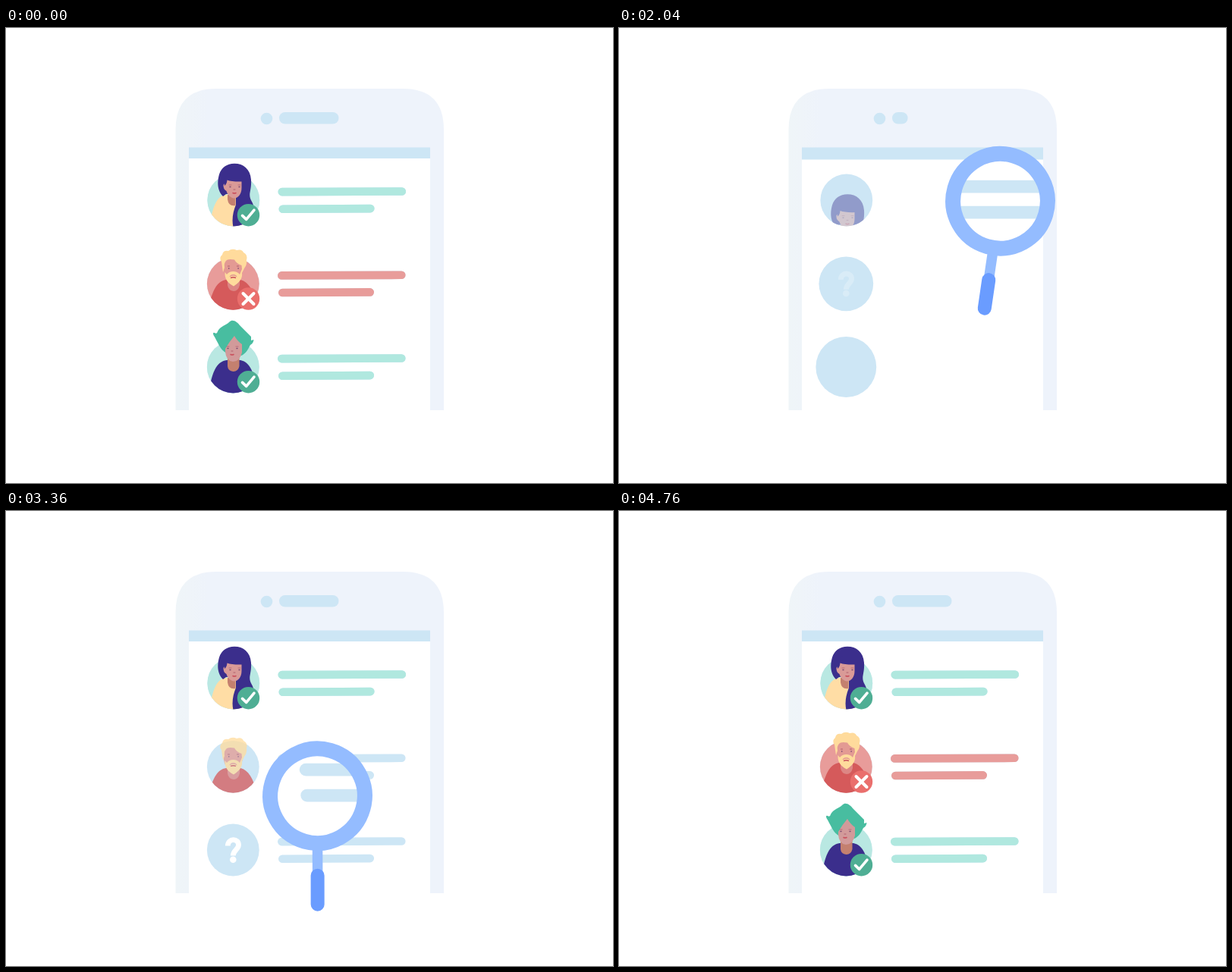
Animation of 800x600 px, one loop 4.88 s. Source, as an HTML page:

```html
<!DOCTYPE html>
<html lang="en">
<head>
<meta charset="utf-8">
<title>Profile check</title>
<style>
  html, body { margin: 0; width: 100%; height: 100%; overflow: hidden; background: #fff; }
  svg { display: block; width: 800px; height: 600px; }
</style>
</head>
<body>
<svg id="stage" viewBox="0 0 800 600" xmlns="http://www.w3.org/2000/svg"></svg>
<script>
const LOOP = 4880, BLUE = '#cde6f5', MINT = '#b0e8df', RED = '#e89c9a';

const rows = [
  { x: 299.8, y: 227, zoomY: 229, tint: '#b9e8e2', bar: MINT, badge: '#4fae94', q: 1640, pop: 1560, enter: 1928, turn: 2220, mark: 2480, fill: 2443 },
  { x: 299.3, y: 337.3, zoomY: 296, tint: RED, bar: RED, badge: '#ea6f6d', cross: true, q: 2000, pop: 1624, enter: 3150, turn: 3400, mark: 3600, fill: 3486 },
  { x: 299.3, y: 447, zoomY: 430, tint: '#b9e8e2', bar: MINT, badge: '#4fae94', q: 2080, pop: 1704, enter: 4180, turn: 4300, mark: 4420, fill: 4284 }
];

const face = (x, y) => `
  <g fill="none" stroke="#b0606f" stroke-width="1" stroke-linecap="round">
    <path d="M${x - 7} ${y - 2}h3M${x + 5} ${y - 2}h3" stroke-width=".8"/>
    <path d="M${x - 6} ${y + .5}h1M${x + 6} ${y + .5}h1" stroke="#7a4a70" stroke-width="1.3"/>
    <path d="M${x - 1} ${y + 4}h2"/><path d="M${x - 2} ${y + 8.5}q2 1.2 4 0" stroke="#c94f5c" stroke-width="1.5"/>
  </g>`;

const people = [
  `<path fill="#ffdda5" d="M268 265C271 240 276 224 287 220.500Q297 218 309 222L318 265Z"/>
   <path fill="#3b2e8c" d="M286 222C277 213 279 200 281 193C284 184 291 178.700 301 178.700C313 178.700 322 186 323 200C324 216 318 219 324 229C328 236 330 252 324 265H300C297 253 299 243 303 233V218L290 219Z"/>
   <path fill="#c4806f" d="M292 220h10.500v14q-9 2-10.500-8Z"/>
   <path fill="#d99a97" d="M289.500 199H310.500V211C310.500 219 306 224.500 300.500 224.500C296 224.500 291.500 219 290.500 215Q286 212 286.500 207Q287.500 204 290 206Z"/>
   <path fill="#3b2e8c" d="M288 208Q286 194 295 191H312V202.500Q298 203 291.500 200.500Q291 206 288 208Z"/>
   ${face(301, 209)}`,
  `<path fill="#d55a5b" d="M265 376C271 348 277 334 290 332H309C321 335 328 349 333 376Z"/>
   <path fill="#dd8684" d="M292 329H308V339Q306 347 300 347Q293 346 292 339Z"/>
   <path fill="#e39a93" d="M287 304H311.500V322Q309 334 299.500 334Q289 334 287 321Z"/>
   <path fill="#ffdb9c" d="M286 322L284 308Q280 303 285 299Q286 293 293 294Q298 290 304 293Q311 291 313 296Q319 299 317 306Q318 312 314 317L311 323C312 331 307 336 300 340.500C292 336 288 331 288.500 322L291 325Q294 321 299.500 321Q305 321 308 325L311 318L310.500 313Q304 311 301 305.500Q292 304 290 307Q287 310 288 316Z"/>
   <path fill="#e39a93" d="M294.500 328.500Q295 325 299.500 325Q304 325 304.500 328.500Q302 326.500 299.500 326.800Q297 326.500 294.500 328.500Z"/>
   <path d="M296 329.500q3.500-1.500 7 0" fill="none" stroke="#c94f5c" stroke-width="1.400"/>
   <path d="M292 314h3m9 0h3" stroke="#b0606f"/><path d="M293 317h1.400m11 0h1.400" stroke="#7a4a70" stroke-width="1.400"/>`,
  `<path fill="#3b2e8c" d="M266 486C271 456 276 440 291 438H309C323 441 327 456 333 486Z"/>
   <path fill="#c4806f" d="M292 432H307.500V446Q306 453 299.500 453Q292.500 452 292 446Z"/>
   <path fill="#48bda0" d="M288 427C282 423 279 414 273.500 405Q272 401 275 402Q278 404 279 400C282 393 291 392 294.500 387.500C299 383 305 388 309 393L323 407V412L326.500 411Q326 416 322 418C318 426 315 430 310 432L292 430Z"/>
   <path fill="#d29a9a" d="M289 423Q294 414 301 406Q305 413 311 417V428Q308 440 299 440Q290 439 289 427Z"/>
   ${face(298, 422)}`
];

// Bar geometry shared by the list and the magnified list
const bars = r => [[r.x + 64, r.y - 11.2, 158], [r.x + 65, r.y + 11.4, 115.5]];
const barLines = (r, i, kind, color) => bars(r).map((b, j) =>
  `<path id="${kind}${i}${j}" fill="none" stroke="${color}" stroke-width="10.600" stroke-linecap="round"/>`).join('');

const blank = (r, i, kind) => `
  <g id="${kind}disc${i}"><circle cx="${r.x}" cy="${r.y}" r="34.400" fill="${BLUE}"/></g>
  <g id="${kind}q${i}" transform="translate(${r.x} ${r.y})">
    <path d="M-7-5.500C-6.800-16 7.500-15.500 7.200-6.500C7-.5 0 .5 0 7.500" fill="none" stroke="#fff" stroke-width="6.800"/>
    <circle cy="12.700" r="4.300" fill="#fff"/>
  </g>`;

const row = (r, i) => `
  ${blank(r, i, 's')}
  <circle id="tint${i}" cx="${r.x}" cy="${r.y}" r="34.400" fill="${r.tint}"/>
  <clipPath id="cut${i}"><path d="M${r.x - 60} ${r.y - 150}h120v150h-25.600a34.400 34.400 0 0 1-68.800 0h-25.600Z"/></clipPath>
  <g clip-path="url(#cut${i})"><g id="person${i}">${people[i]}</g></g>
  <g id="badge${i}"><circle r="14.700" fill="${r.badge}"/>
    <g fill="none" stroke="#fff" stroke-width="${r.cross ? 4 : 3.6}" stroke-linecap="round" stroke-linejoin="round">
      ${(r.cross ? ['M-7-7L7 7', 'M7-7L-7 7'] : ['M-8 .7L-2.800 5.700L7.500-6.500'])
        .map((d, k) => `<path id="mark${i}${k}" pathLength="1" d="${d}"/>`).join('')}
    </g></g>
  ${barLines(r, i, 'bar', BLUE)}${barLines(r, i, 'fill', r.bar)}`;

const zoomRow = (r, i) => `
  <g transform="translate(299.500 ${r.zoomY}) scale(1.500) translate(-299.500 ${-r.zoomY})">
    ${blank(r, i, 'z')}
    <g id="zbars${i}" stroke="${BLUE}" stroke-width="11.200" stroke-linecap="round">
      ${bars(r).map(([x, y, w]) => `<path d="M${x} ${y}h${w}"/>`).join('')}</g>
  </g>`;

document.getElementById('stage').innerHTML = `
  <defs>
    <linearGradient id="shell"><stop stop-color="#eff5f8"/><stop offset=".05" stop-color="#eff4f9"/><stop offset=".12" stop-color="#eef3fb"/></linearGradient>
    <clipPath id="lensCut"><circle id="lensHole" r="54"/></clipPath>
  </defs>
  <g id="scene">
    <path id="phone" fill="url(#shell)" d="M223.500 504V134Q223.500 80 277.500 80H523Q577 80 577 134V504H559V158H241V504Z"/>
    <rect id="band" y="157.500" fill="${BLUE}"/>
    <g id="dot"><circle r="7.800" fill="${BLUE}"/></g>
    <rect id="speaker" x="360" y="111" height="15.500" rx="7.750" fill="${BLUE}"/>
    ${rows.map(row).join('')}
  </g>
  <g id="lens" clip-path="url(#lensCut)"><rect width="800" height="600" fill="#fff"/>${rows.map(zoomRow).join('')}</g>
  <g id="glass">
    <g id="arm" stroke="#94bcff" fill="none">
      <path id="stem" stroke-width="13.500"/>
      <path id="grip" stroke="#6a9cff" stroke-width="18" stroke-linecap="round"/>
    </g>
    <circle id="ring" r="62.300" pathLength="360" fill="none" stroke="#94bcff" stroke-width="20" stroke-linecap="round"/>
  </g>`;

const parts = {};
document.querySelectorAll('#stage [id]').forEach(e => parts[e.id] = e);
const set = (id, attrs) => { for (const k in attrs) parts[id].setAttribute(k, attrs[k]); };
const fade = (id, o) => set(id, { opacity: o });

const seg = (t, a, b) => Math.min(1, Math.max(0, (t - a) / (b - a)));
const inOut = u => u < .5 ? 4 * u ** 3 : 1 - 4 * (1 - u) ** 3;
const outQuad = u => 1 - (1 - u) ** 2;
const back = (u, s) => u <= 0 ? 0 : 1 + (s + 1) * (u - 1) ** 3 + s * (u - 1) ** 2;

// Eased moves between stops: [start, end, value]
const travel = (t, from, moves) => moves.reduce((v, [a, b, to]) => v + (to - v) * inOut(seg(t, a, b)), from);

// Smooth curve through [time, value] keys
function curve(t, keys) {
  const n = keys.length - 1;
  if (t <= keys[0][0]) return keys[0][1];
  if (t >= keys[n][0]) return keys[n][1];
  const i = keys.findIndex(k => k[0] > t) - 1;
  const slope = k => k < 1 || k >= n ? 0 : (keys[k + 1][1] - keys[k - 1][1]) / (keys[k + 1][0] - keys[k - 1][0]);
  const [t0, a] = keys[i], [t1, b] = keys[i + 1], d = t1 - t0, u = (t - t0) / d, w = 1 - u;
  return a * w * w * (1 + 2 * u) + b * u * u * (3 - 2 * u) + d * u * w * (slope(i) * w - slope(i + 1) * u);
}

const swing = [[1000, 125], [1090, 126], [1350, -47], [1520, 16], [1680, 0], [1880, -30], [2040, -8.5],
  [2210, 22], [2360, 0], [2560, 18], [2760, 3.2], [2960, -26], [3110, 4], [3230, -14], [3360, 0],
  [3540, 8], [3660, 4], [3840, 52.6], [4000, 45], [4110, 8], [4230, -42], [4340, 0], [4460, 125]];

function drawBar(id, [x, y, w], u) {
  set(id, { d: `M${x} ${y + .3}L${x + w * u} ${y + .3 - .6 * u}`, visibility: u > 0 ? 'visible' : 'hidden' });
}

function drawRow(r, i, t) {
  const s = back(seg(t, r.pop, r.pop + 480), 3);
  const q = seg(t, r.q, r.q + 160) * (1 - seg(t, r.enter - 120, r.enter));
  for (const k of 'sz') {
    set(k + 'disc' + i, { transform: `translate(${r.x} ${r.y}) scale(${s}) translate(${-r.x} ${-r.y})` });
    fade(k + 'q' + i, q);
  }
  fade('zbars' + i, seg(t, 1640, 1720));
  fade('tint' + i, seg(t, r.turn, r.turn + 140));

  const p = seg(t, r.enter, r.enter + 280);
  set('person' + i, { opacity: p, transform: `translate(0 ${114 * (1 - p) ** 2})` });

  set('badge' + i, { transform: `translate(319.500 ${r.y + 19.7}) scale(${back(seg(t, r.mark, r.mark + 160), 1.7)})` });
  const strokes = r.cross ? [[100, 200], [200, 280]] : [[120, 270]];
  strokes.forEach(([a, b], k) => {
    const u = seg(t, r.mark + a, r.mark + b);
    set('mark' + i + k, { 'stroke-dasharray': u < 1 ? `${u} 2` : 'none', visibility: u > 0 ? 'visible' : 'hidden' });
  });

  bars(r).forEach((b, j) => {
    const start = 2180 + 80 * i + 40 * j, f = r.fill + 32 * j;
    drawBar(`bar${i}${j}`, b, outQuad(seg(t, start, start + 460)));
    drawBar(`fill${i}${j}`, b, inOut(seg(t, f, f + 440)));
  });
}

function drawPhone(t) {
  const k = 1 + .028 * Math.sin(Math.PI * seg(t, 1700, 2000));
  set('phone', { opacity: seg(t, 1540, 1720), transform: `translate(0 292) scale(1 ${k}) translate(0 -292)` });
  const w = 318 * inOut(seg(t, 1440, 1640));
  set('band', { x: 400 - w / 2, width: w, height: 16 - 1.5 * seg(t, 2040, 2160) });
  set('dot', { transform: `translate(343.500 119.500) scale(${back(seg(t, 1860, 2030), 1.7)})` });
  const u = seg(t, 1970, 2230);
  set('speaker', { width: u > 0 ? 15.5 + 63 * inOut(u) : 0 });
}

function drawGlass(t) {
  const x = travel(t, 300, [[1682, 2200, 529], [2300, 3104, 300], [3110, 3618, 529], [3640, 4170, 300]]) + 1.2 * seg(t, 2240, 2760) * (1 - seg(t, 2760, 3100));
  const y = travel(t, 226, [[1682, 2200, 228.5], [2300, 3104, 346.5], [3110, 3618, 407], [3640, 3840, 445.3], [3840, 4080, 441]]);
  const p = inOut(seg(t, 923, 1163)) * (1 - inOut(seg(t, 4357, 4597)));
  const reach = 72 + 80 * seg(t, 1010, 1160) * (1 - seg(t, 4350, 4460));

  set('lensHole', { cx: x, cy: y });
  fade('lens', seg(t, 1160, 1200) * (1 - seg(t, 4340, 4460)));
  set('glass', { transform: `translate(${x} ${y})`, visibility: p > 0 ? 'visible' : 'hidden' });
  set('ring', {
    transform: `rotate(${-35 - 219 * p})`,
    'stroke-dasharray': p < 1 ? `${360 * p} 720` : 'none'
  });
  set('arm', { transform: `rotate(${-curve(t, swing)})`, visibility: p > 0 && reach > 72 ? 'inherit' : 'hidden' });
  set('stem', { d: `M0 62V${Math.min(reach, 106)}` });
  set('grip', { d: `M0 105V${Math.max(105, reach - 9)}`, visibility: reach > 112 ? 'inherit' : 'hidden' });
}

function render(t) {
  const leaving = t < 960, when = leaving ? LOOP : t;
  fade('scene', leaving ? 1 - seg(t, 560, 920) : 1);
  drawPhone(when);
  rows.forEach((r, i) => drawRow(r, i, when));
  drawGlass(t);
}

const begin = performance.now();
function tick() {
  render((performance.now() - begin) % LOOP);
  requestAnimationFrame(tick);
}
tick();
</script>
</body>
</html>
```
